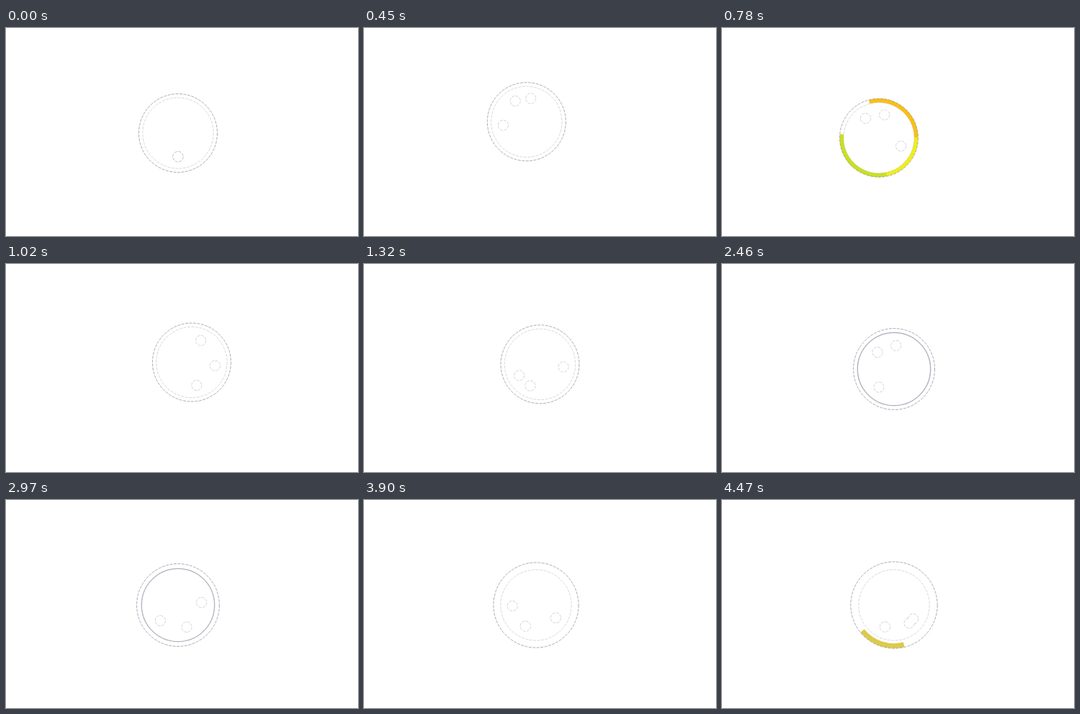
Recreate the animation shown at these times as an HTML page with a canvas. Size 489x289 px, loop 4500 ms.

```html
<!DOCTYPE html>
<html lang="en">
<head>
<meta charset="utf-8">
<title>Rolling ring loader</title>
<style>
  html, body { margin: 0; width: 100%; height: 100%; overflow: hidden; background: #fff; }
  canvas { display: block; }
</style>
</head>
<body>
<canvas id="stage" width="489" height="289"></canvas>
<script>
const ctx = document.getElementById('stage').getContext('2d');
const LOOP = 4.5, STEP = 0.03, SWING = 1.62, ORBIT = 32.8, BALL = 7;
const { PI, sin, cos, exp, min, max } = Math;

const rad = deg => deg * PI / 180;
const clamp01 = v => min(1, max(0, v));

// The ring swings out and settles back at its centre
function ringCentre(t) {
  const swell = t < SWING ? sin(PI * t / SWING) : 0;
  return [
    239 - 22.2 * swell * cos(16 * (t - 0.8)),
    146 - swell * (11 + 30.5 * cos(10.42 * (t - 0.57)))
  ];
}

// The leader speeds up with a fading surge; the others trail behind it
function ballAngles(t) {
  const surge = 56 * (1 - t / 4.9) * sin(4 * PI * t / LOOP);
  const lead = 90 + 305 * t + 23 * t * t + surge;
  const spread = min(1, t / 0.6);
  const wobble = 56 * exp(-0.6 * t) * cos(5.5 * (t - 0.78));
  return [lead, lead - spread * (62 + wobble), lead - 145 * min(spread, 5 - t)];
}

function arc(x, y, r, color, width, from = 0, to = 360) {
  ctx.beginPath();
  ctx.arc(x, y, r, rad(from), rad(to));
  ctx.strokeStyle = color;
  ctx.lineWidth = width;
  ctx.stroke();
}

// Thin broken outline
function outline(x, y, r, color, width = 0.7) {
  ctx.setLineDash([4, 1.5]);
  arc(x, y, r, color, width);
  ctx.setLineDash([]);
}

function drawSweep(t, x, y, outer) {
  if (t >= 0.6 && t < 1) {
    const head = 255 + 360 * clamp01((t - 0.6) / 0.223);
    const tail = 255 + 360 * clamp01((t - 0.825) / 0.175);
    const parts = [[255, 360, '#fbbf12'], [360, 438, '#f0ee18'], [438, 615, '#c9e01e']];
    for (const [from, to, color] of parts) {
      const a = max(from, tail), b = min(to, head);
      if (b > a) arc(x, y, outer - 2.8, color, 5.4, a, b);
    }
  }
  if (t >= 4.38) arc(x, y, outer - 3.6, '#dcca4a', 6.8, 76, 76 + 722 * (t - 4.38));
}

function draw(t) {
  const [x, y] = ringCentre(t);
  const bulge = clamp01(sin(PI * clamp01((t - 1.6) / 2.2)));
  const shade = bulge ** 4;
  const outer = 54.5 + 1.85 * max(0, t - 1.4);
  const inner = 49.2 + 1.6 * bulge;

  ctx.fillStyle = '#fff';
  ctx.fillRect(0, 0, 489, 289);
  drawSweep(t, x, y, outer);
  outline(x, y, outer, '#888');
  outline(x, y, inner, '#c6c8cc');
  if (shade > 0) arc(x, y, inner, `rgba(160,160,178,${shade})`, 1.3);

  const balls = ballAngles(t).map(deg =>
    [x + ORBIT * cos(rad(deg)), y + ORBIT * sin(rad(deg))]);
  for (const [bx, by] of balls) outline(bx, by, BALL, '#b4b4ba');
  // White fills merge overlapping balls
  ctx.fillStyle = '#fff';
  for (const [bx, by] of balls) {
    ctx.beginPath();
    ctx.arc(bx, by, BALL - 0.35, 0, 2 * PI);
    ctx.fill();
  }
}

const start = performance.now();
function tick() {
  const t = (performance.now() - start) / 1000 % LOOP;
  draw(Math.floor(t / STEP) * STEP);
  requestAnimationFrame(tick);
}
tick();
</script>
</body>
</html>
```
